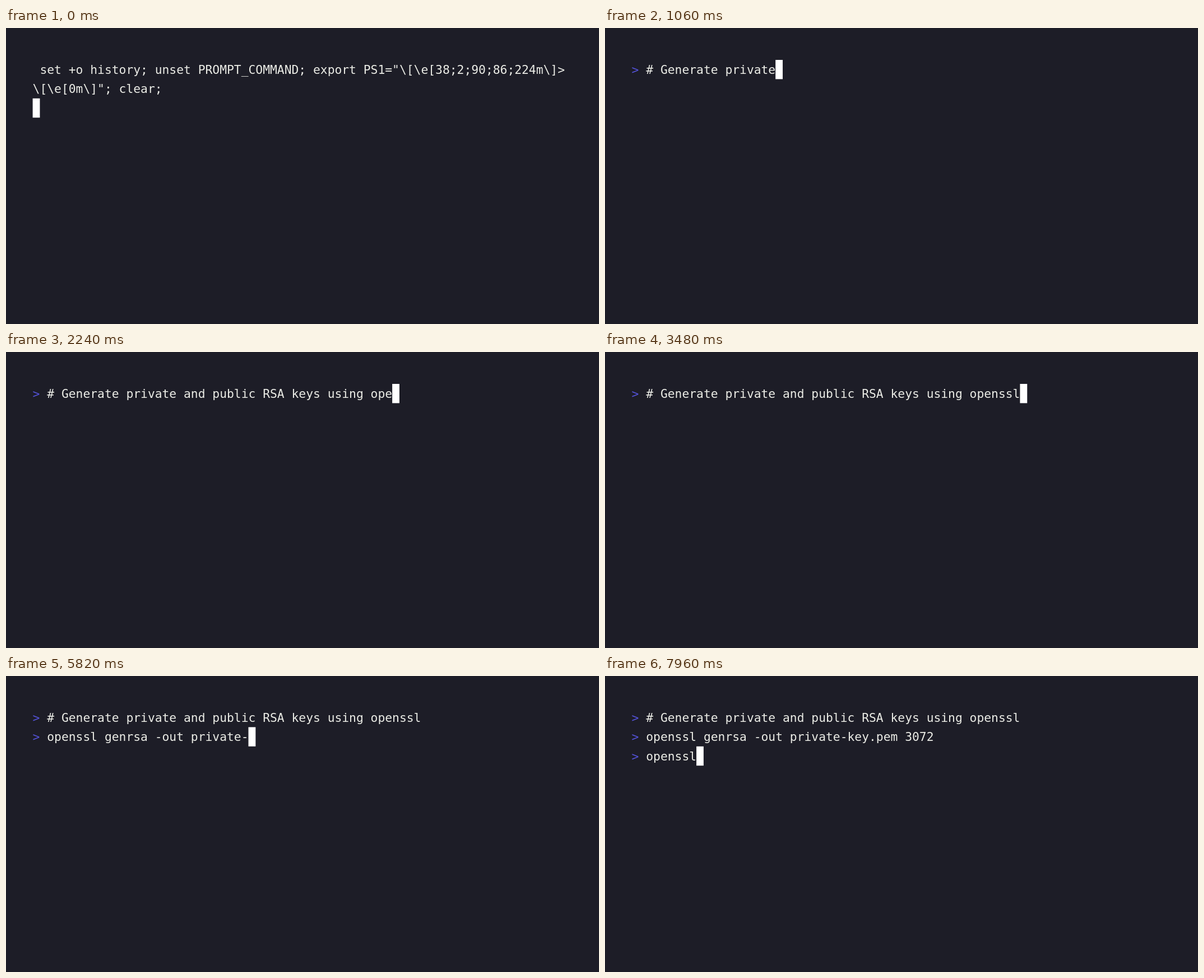
These frames come from a looping animation (1058 px wide and 529 px high, 8000 ms). An HTML page with a canvas:

```html
<!DOCTYPE html>
<html lang="en">
<head>
<meta charset="utf-8">
<title>Terminal: RSA keys</title>
<style>
  html, body { margin: 0; width: 100%; height: 100%; overflow: hidden; background: #1d1d27; }
  canvas { display: block; }
</style>
</head>
<body>
<canvas id="stage" width="1058" height="529"></canvas>
<script>
const ctx = document.getElementById('stage').getContext('2d');
const LOOP = 8000, TICK = 20, BLINK = 550;
const LEFT = 47.6, TOP = 57, CELL = 12.83, ROW = 34.4, BASELINE = 25;
const BG = '#1d1d27', INK = '#ebece6', ACCENT = '#5452d8', CURSOR = '#ffffff';

const SETUP = [
  ' set +o history; unset PROMPT_COMMAND; export PS1="\\[\\e[38;2;90;86;224m\\]>',
  '\\[\\e[0m\\]"; clear;'
];

// prompt: when the line appears; wake: when its cursor blink begins;
// start, end: first and last keystroke; enter: when the line is submitted
const LINES = [
  { text: '# Generate private and public RSA keys using openssl',
    wake: -200, prompt: 40, start: 460, end: 2400, enter: 4240 },
  { text: 'openssl genrsa -out private-key.pem 3072',
    wake: 4240, prompt: 4240, start: 4720, end: 6340, enter: 6820 },
  { text: 'openssl',
    wake: 7040, prompt: 7040, start: 7700, end: 7960, enter: LOOP }
];

// Typing starts a little faster than it ends
function typedCount({ text, start, end }, t) {
  if (t < start) return 0;
  const progress = Math.min(1, (t - start) / (end - start));
  return Math.floor(1 + (text.length - 1) * progress ** 0.9);
}

function cursorVisible({ wake, start, end }, t) {
  const lastInput = t < start ? wake : Math.min(t, end);
  return Math.floor((t - lastInput + 30) / BLINK) % 2 === 0;
}

function write(text, col, row, color) {
  ctx.fillStyle = color;
  [...text].forEach((ch, i) =>
    ctx.fillText(ch, LEFT + (col + i) * CELL, TOP + row * ROW + BASELINE));
}

function drawCursor(col, row) {
  ctx.fillStyle = CURSOR;
  ctx.fillRect(LEFT + col * CELL, TOP + row * ROW, CELL, ROW);
}

function draw(t) {
  ctx.fillStyle = BG;
  ctx.fillRect(0, 0, 1058, 529);
  ctx.font = '21.31px "DejaVu Sans Mono", monospace';

  if (t < TICK) {
    SETUP.forEach((line, row) => write(line, 0, row, INK));
    drawCursor(0, SETUP.length);
    return;
  }

  const shown = LINES.filter(line => t >= line.prompt);
  shown.forEach((line, row) => {
    write('>', 0, row, ACCENT);
    write(line.text.slice(0, typedCount(line, t)), 2, row, INK);
  });

  const row = shown.length - 1, active = shown[row];
  if (!active || t >= active.enter) drawCursor(0, row + 1);
  else if (cursorVisible(active, t)) drawCursor(2 + typedCount(active, t), row);
}

function frame() {
  const t = performance.now() % LOOP;
  draw(Math.floor(t / TICK) * TICK);
  requestAnimationFrame(frame);
}
frame();
</script>
</body>
</html>
```
